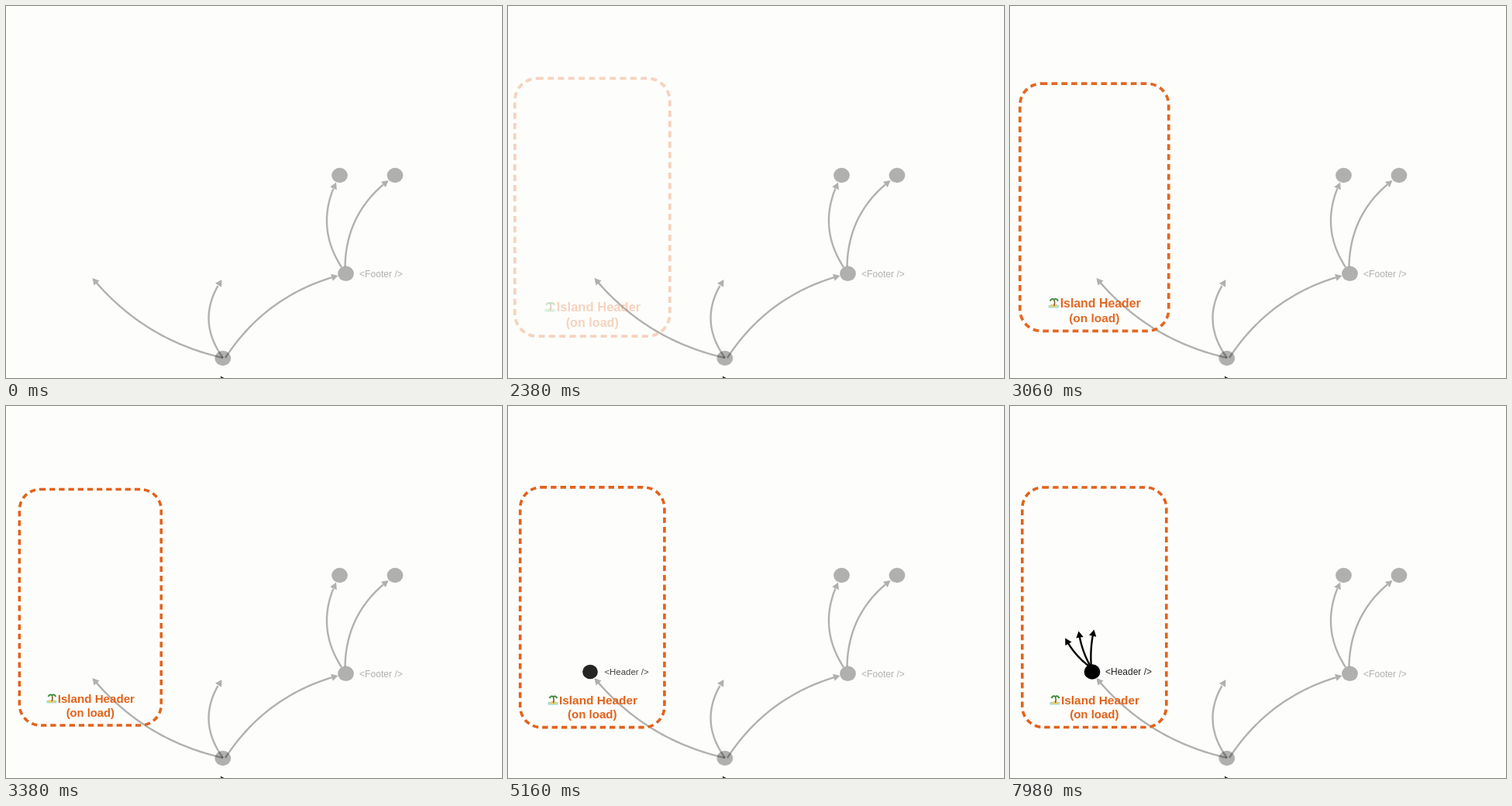
An HTML page with a canvas that plays this animation: 640x480 px, repeating every 8000 ms.

```html
<!DOCTYPE html>
<html lang="en">
<head>
<meta charset="utf-8">
<title>Island hydration</title>
<style>
  html, body { margin: 0; width: 100%; height: 100%; overflow: hidden; background: #fdfdfb; }
  canvas { display: block; }
</style>
</head>
<body>
<canvas id="stage" width="640" height="480"></canvas>
<script>
const ctx = document.getElementById('stage').getContext('2d');
const LOOP = 8000, ISLAND_AT = 1930, HEADER_AT = 4180, BRANCH_AT = 6340;
const FONT = '"Liberation Sans", Arial, sans-serif';
const PAPER = '#fdfdfb', ORANGE = '#e2621b', FADED = 'rgba(0, 0, 0, 0.3)';

const smooth = u => (1 - Math.cos(Math.PI * Math.min(1, u))) / 2;

// Swing up past full size, then ring down like a damped spring.
function bounce(ms) {
  const rise = 575, over = 0.14, period = 650;
  if (ms < rise) return (1 + over) * Math.sin(Math.PI / 2 * ms / rise);
  const rest = ms - rise;
  return 1 + over * Math.exp(-0.0018 * rest) * Math.cos(2 * Math.PI * rest / period);
}

function popIn(ms, cx, cy, draw) {
  if (ms <= 0) return;
  const scale = bounce(ms);
  ctx.save();
  ctx.globalAlpha = smooth(ms / 1300);
  ctx.translate(cx, cy);
  ctx.scale(scale, scale);
  ctx.translate(-cx, -cy);
  draw();
  ctx.restore();
}

function node(x, y, color) {
  ctx.fillStyle = color;
  ctx.beginPath();
  ctx.ellipse(x, y, 10.4, 9.7, 0, 0, 7);
  ctx.fill();
}

function label(text, x, y, font, color, align = 'left') {
  ctx.font = `${font} ${FONT}`;
  ctx.fillStyle = color;
  ctx.textAlign = align;
  ctx.fillText(text, x, y);
}

// Arrow bowed to the left by `bow` times its length, drawn up to fraction `end`.
function arrow(x0, y0, x1, y1, bow, color, end = 1) {
  const cx = (x0 + x1) / 2 + (y1 - y0) * bow;
  const cy = (y0 + y1) / 2 - (x1 - x0) * bow;
  const mix = (a, b, c, u) => (1 - u) ** 2 * a + 2 * u * (1 - u) * b + u * u * c;
  const at = u => [mix(x0, cx, x1, u), mix(y0, cy, y1, u)];
  const tip = at(end);
  const neck = Math.max(0, end - 8 / Math.hypot(x1 - x0, y1 - y0));
  const base = at(neck);

  ctx.strokeStyle = ctx.fillStyle = color;
  ctx.lineWidth = 2.4;
  ctx.beginPath();
  for (let i = 0; i <= 40; i++) ctx.lineTo(...at(neck * i / 40));
  ctx.stroke();

  ctx.save();
  ctx.translate(...tip);
  ctx.rotate(Math.atan2(tip[1] - base[1], tip[0] - base[0]));
  ctx.beginPath();
  ctx.moveTo(0, 0);
  ctx.lineTo(-8.5, -4.7);
  ctx.lineTo(-8.5, 4.7);
  ctx.fill();
  ctx.restore();
}

function palm(x, y) {
  ctx.fillStyle = '#8fe0ea';
  ctx.fillRect(x, y + 9, 13, 3.5);
  ctx.fillStyle = '#e8cf7a';
  ctx.beginPath();
  ctx.ellipse(x + 6.5, y + 10, 5, 2, 0, 0, 7);
  ctx.fill();
  ctx.strokeStyle = '#76532c';
  ctx.lineWidth = 1.5;
  ctx.beginPath();
  ctx.moveTo(x + 7, y + 10);
  ctx.quadraticCurveTo(x + 8.5, y + 6, x + 7, y + 2);
  ctx.stroke();
  ctx.strokeStyle = '#3f8f37';
  ctx.lineWidth = 2;
  ctx.beginPath();
  ctx.moveTo(x + 2, y + 4);
  ctx.quadraticCurveTo(x + 4, y, x + 7, y + 2);
  ctx.quadraticCurveTo(x + 10, y, x + 12, y + 4);
  ctx.stroke();
}

function island() {
  ctx.strokeStyle = ORANGE;
  ctx.lineWidth = 3.6;
  ctx.setLineDash([7.4, 5]);
  ctx.beginPath();
  ctx.roundRect(15.8, 105, 186, 309.5, 27);
  ctx.stroke();
  ctx.setLineDash([]);
  palm(51.5, 373);
  label('Island Header', 66, 385, 'bold 15.4px', ORANGE);
  label('(on load)', 108.8, 403, 'bold 15px', ORANGE, 'center');
}

function tree() {
  node(430.5, 218.5, FADED);
  node(502, 218.5, FADED);
  node(438.5, 345.3, FADED);
  node(279.8, 454.5, FADED);
  arrow(280, 454, 111.5, 351, 0.17, FADED);
  arrow(280, 454, 278.5, 353, 0.35, FADED);
  arrow(283, 454, 428.5, 348, 0.19, FADED);
  arrow(433, 337, 426, 227.5, 0.28, FADED);
  arrow(437.5, 336, 493.5, 225, 0.24, FADED);
  label('<Footer />', 456, 349.5, '12.1px', FADED);
}

// Tip of the arrow rising from below the stage.
function risingTip() {
  ctx.fillStyle = '#111';
  ctx.beginPath();
  ctx.moveTo(276.5, 477.5);
  ctx.lineTo(281.5, 480);
  ctx.lineTo(277.5, 480);
  ctx.fill();
}

function branches(grown) {
  arrow(105, 338, 71, 299, 0.12, '#000', grown);
  arrow(105, 338, 88.5, 290, 0.1, '#000', grown);
  arrow(105, 338, 108.5, 288, 0.08, '#000', grown);
}

function render(t) {
  ctx.fillStyle = PAPER;
  ctx.fillRect(0, 0, 640, 480);
  tree();
  risingTip();
  popIn(t - ISLAND_AT, 109, 259.5, island);
  popIn(t - HEADER_AT, 106, 343, () => node(106, 343, '#000'));
  popIn(t - HEADER_AT, 153, 343, () => label('<Header />', 123, 347.3, '12px', '#222'));
  if (t >= BRANCH_AT) branches(0.25 + 0.75 * (t - BRANCH_AT) / (LOOP - BRANCH_AT));
}

const start = performance.now();
function tick() {
  render((performance.now() - start) % LOOP);
  requestAnimationFrame(tick);
}
tick();
</script>
</body>
</html>
```
